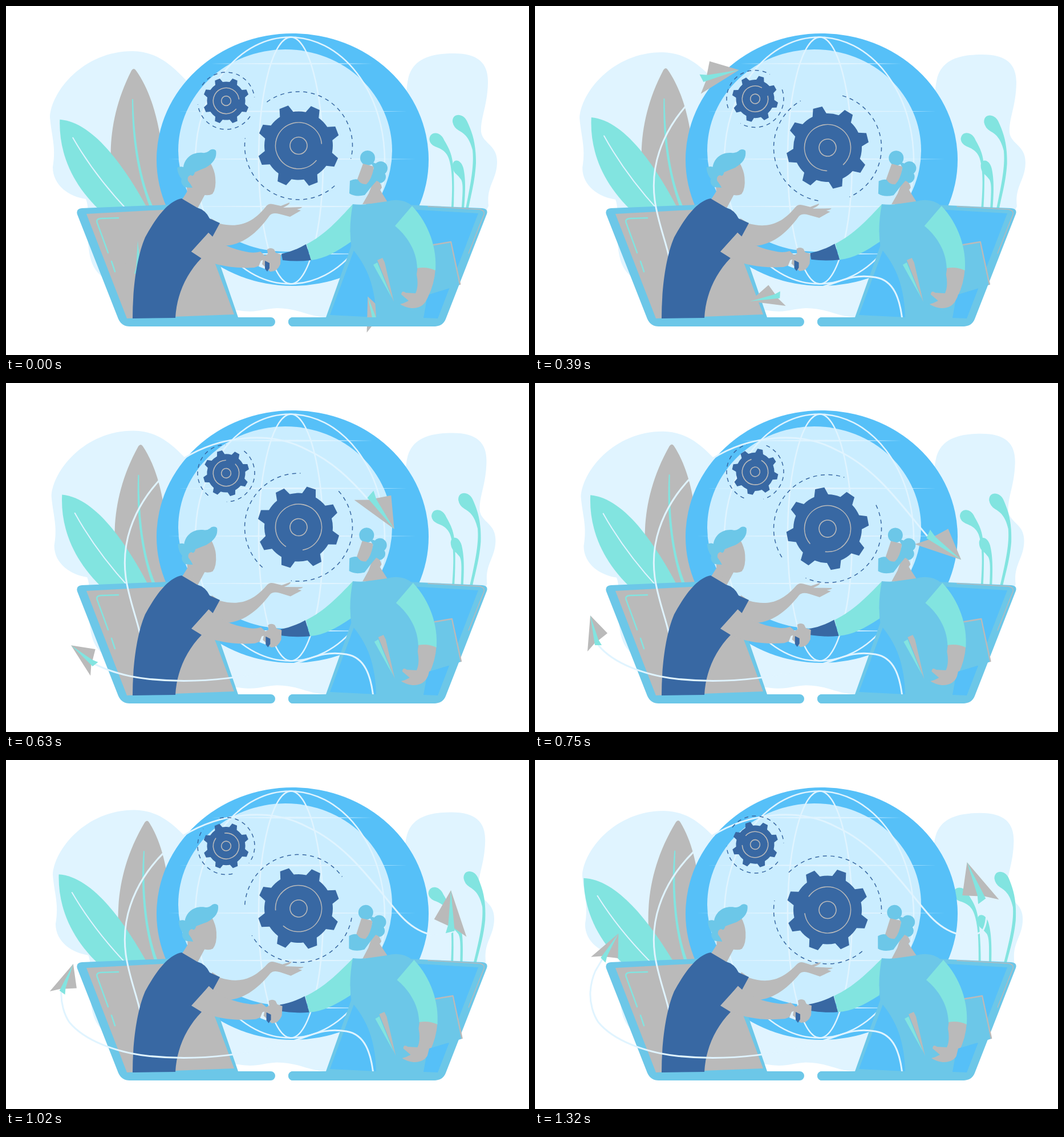
Animation of 917x611 px, one loop 1350 ms. Source, as an HTML page:

```html
<!DOCTYPE html>
<html lang="en">
<head>
<meta charset="utf-8">
<title>Online partnership</title>
<style>
  html, body { margin: 0; width: 100%; height: 100%; overflow: hidden; background: #fff; }
  svg { display: block; width: 100vw; height: 100vh; }
  .pale { fill: #e0f4ff; } .sky { fill: #56c0f8; } .blue { fill: #6cc7e8; }
  .teal { fill: #82e4e0; } .gray { fill: #bababa; } .navy { fill: #3868a3; }
  .line { fill: none; stroke-linecap: round; stroke-linejoin: round; }
  .line.pale { stroke: #e0f4ff; } .line.teal { stroke: #82e4e0; }
  .line.gray { stroke: #bababa; } .line.navy { stroke: #3868a3; stroke-linecap: butt; }
</style>
</head>
<body>
<svg viewBox="0 0 917 611">
  <path id="blob" class="pale" d="M77 195C79 150 135 79 222 79C270 80 295 108 330 145L690 200C704 175 700 150 705 128C712 95 740 83 785 83C830 83 846 102 845 135C844 175 832 195 833 220C836 242 862 242 861 275C860 305 842 315 846 350L800 450L640 540L560 545C525 542 515 530 475 529C450 530 440 538 408 533L260 520L170 475C150 460 145 440 143 400C143 375 146 352 140 338C112 334 82 315 82 282C88 245 80 230 77 195Z"/>

  <g id="tallLeaf">
    <path class="gray" d="M220 113Q224 107 228 113C258 155 282 230 280 380L205 380C180 310 168 215 220 113Z"/>
    <path class="teal" d="M221 163L223 163C225 230 234 300 258 352L252 352C230 295 220 230 221 163Z"/>
  </g>
  <g id="wideLeaf">
    <path class="teal" d="M94 199C150 203 205 275 252 362L178 370C118 320 92 260 94 199Z"/>
    <path class="line pale" stroke-width="2" d="M117 231Q155 297 215 360"/>
  </g>
  <path id="stemTall" class="teal" d="M783 203C782 187 801 187 808 201C818 222 824 240 824 275C822 310 815 330 809 365L804 365C815 310 821 280 818 252C812 229 803 223 794 218Q785 213 783 203Z"/>
  <path id="stemMid" class="teal" d="M742 234C742 219 761 218 768 235C778 252 784 262 785 300Q786 335 784 365L780 365C783 320 783 290 777 270C773 255 763 250 752 246Q743 242 742 234Z"/>
  <path id="stemLow" class="teal" d="M783 279C784 266 798 268 802 284C806 302 806 325 802 365L798 365C801 325 802 312 798 304Q793 297 787 292Q783 287 783 279Z"/>

  <ellipse class="sky" cx="502.500" cy="269" rx="238.500" ry="221"/>
  <ellipse fill="#caedff" cx="489.500" cy="253" rx="187.500" ry="177"/>
  <g class="line pale" stroke-width="2.500">
    <ellipse cx="498" cy="270.500" rx="166" ry="216"/>
    <ellipse cx="499.500" cy="270.500" rx="56.500" ry="216"/>
  </g>
  <path class="pale" d="M360 101L500 99.500 642 101 500 102.500ZM303 184.500L500 183 703 184.500 500 186ZM285 268L500 266.500 718 268 500 269.500ZM303 351L500 349.500 703 351 500 352.500ZM360 434L500 432.500 642 434 500 435.500Z"/>

  <path class="blue" d="M133 354L332 346L376 455L407 545H464A8 8 0 0 1 464 561H217Q203 561 197 548L125 365Q122 355 133 354Z"/>
  <path class="gray" d="M141 364L328 354L369 457L400 540L212 547Z"/>
  <path class="line teal" stroke-width="2.500" d="M197 371L166 372Q157 373 160 380L179 432M185 447L191 465"/>

  <path class="blue" d="M561 545L632 345L835 354Q846 355 843 364L771 548Q766 561 750 561H503A8 8 0 0 1 503 545Z"/>
  <path class="sky" d="M568 541L638 352L828 363L757 547L650 545Z"/>
  <path class="line gray" stroke-width="1.300" d="M740 351L830 356Q840 358 838 365L811 433"/>

  <g id="globeFlight"></g>
  <g id="gears"></g>

  <g id="leftMan">
    <path id="raisedArm" class="gray" d="M360 372L375 381C405 388 430 383 455 352Q460 345 468 347L482 350L497 344Q499 347 486 353L519 352Q519 354 510 356L517 358L498 369L479 364Q467 361 462 367C440 398 415 419 380 420L350 405Z"/>
    <path class="gray" d="M322 318L308 340L336 354L350 328Z"/>
    <path class="navy" d="M308 337C284 341 262 372 244 405C229 440 222 495 222 547L297 546C299 508 314 471 343 441L325 430L355 397L362 404L375 380L357 372Q350 357 335 353Z"/>
    <path id="loweredArm" class="gray" d="M355 397L325 430L343 442C365 454 400 460 435 458L450 453L457 440L446 430Q436 433 425 431C395 426 372 415 355 397Z"/>
    <g id="leftHead">
      <path class="gray" d="M318 290L330 284L358 274Q366 288 367 300Q369 320 362 329Q355 333 344 330L336 345L318 330L316 305Z"/>
      <path class="blue" d="M300 283Q306 280 311 282C313 267 326 255 345 257Q352 258 358 252Q364 249 368 253C371 268 360 277 350 283Q340 287 331 291Q329 300 324 296Q317 298 319 306Q324 312 327 318Q317 318 313 317Q305 310 308 303Q301 295 300 283Z"/>
    </g>
  </g>

  <g id="lowFlight"></g>

  <g id="rightMan">
    <g id="rightArm">
      <path class="teal" d="M608 347L606 412C580 430 560 442 535 445L527 417C560 400 582 375 608 347Z"/>
      <path class="navy" d="M526 417L535 445Q510 448 485 445L483 434Q506 429 526 417Z"/>
    </g>
    <g id="hands">
      <path class="pale" d="M447 446L455 443L456 461L443 456Z"/>
      <path class="gray" d="M458 426Q464 422 470 426L473 432L482 435L481 452Q475 466 463 465L449 452L452 438L459 434Z"/>
      <path class="navy" d="M454 446L462 450L462 459L458 465L454 460Z"/>
    </g>
    <g id="rightHead">
      <circle class="blue" cx="634" cy="266" r="13"/>
      <circle class="blue" cx="657" cy="284" r="12"/>
      <circle class="blue" cx="655" cy="299" r="11"/>
      <path class="gray" d="M645 305L636 328L625 347L670 345L656 322L659 318Q657 306 645 305Z"/>
      <path class="gray" d="M626 276L645 281L642 304L632 316L615 306Z"/>
      <path class="blue" d="M603 306Q612 302 617 304Q622 313 632 312Q641 304 645 283L638 272L655 278L655 300L641 316L629 331Q612 335 602 328Z"/>
    </g>
    <path class="blue" d="M608 347Q625 349 640 346L668 342Q695 335 712 350L724 375L740 500L732 547H649C648 500 638 460 606 424Q600 390 608 347Z"/>
    <g id="rightSide">
      <path class="blue" d="M740 421L778 413L796 488L715 514Z"/>
      <path class="line gray" stroke-width="2.500" d="M750 418L780 413L796 487"/>
      <path class="gray" d="M651 445L660 441L664 449L680 518Z"/>
      <path class="teal" d="M644 453L651 449L677 512Z"/>
      <path class="gray" d="M722 455L753 460Q751 490 737 515C730 530 710 534 691 522Q699 520 706 516L693 505Q694 497 701 502L718 503Q724 490 720 470Z"/>
      <path class="teal" d="M712 350C742 382 756 425 753 463Q738 456 721 459C720 425 700 400 682 385Z"/>
    </g>
    <path class="blue" d="M503 545H764Q758 561 750 561H503A8 8 0 0 1 503 545Z"/>
    <path class="sky" d="M742 505L776 495L757 547L732 546Z"/>
  </g>
</svg>

<script>
const LOOP = 1350, STEP = 30;
const $ = id => document.getElementById(id);

function add(parent, tag, attrs) {
  const el = document.createElementNS('http://www.w3.org/2000/svg', tag);
  for (const name in attrs) el.setAttribute(name, attrs[name]);
  return parent.appendChild(el);
}

const polar = (r, deg) => {
  const a = deg * Math.PI / 180;
  return (r * Math.cos(a)).toFixed(2) + ' ' + (r * Math.sin(a)).toFixed(2);
};
const arc = (r, from, to) =>
  `M${polar(r, from)}A${r} ${r} 0 ${to - from > 180 ? 1 : 0} 1 ${polar(r, to)}`;

// Gears
function makeGear({ x, y, size, tooth, gap, ring, dashes, dy, turn }) {
  const group = add($('gears'), 'g', {});
  let d = '';
  for (let i = 0; i < 8; i++) {
    const a = tooth + i * 45;
    d += `${i ? 'L' : 'M'}${polar(60 * size, a - 12)}L${polar(72.5 * size, a - 6.5)}` +
         `L${polar(72.5 * size, a + 6.5)}L${polar(60 * size, a + 12)}` +
         `A${60 * size} ${60 * size} 0 0 1 ${polar(60 * size, a + 33)}`;
  }
  add(group, 'path', { class: 'navy', d: d + 'Z' });
  const rings = arc(40.5 * size, gap[1], gap[0] + 360) + arc(15 * size, 0, 180) + arc(15 * size, 180, 360);
  add(group, 'path', { class: 'line gray', 'stroke-width': 1.6, d: rings });
  for (const start of dashes)
    add(group, 'path', { class: 'line navy', 'stroke-width': 1.5, 'stroke-dasharray': '7 6.5', d: arc(ring, start, start + 140) });
  return (t, ease) => group.setAttribute('transform',
    `translate(${x} ${y + dy * ease}) rotate(${turn * t / LOOP})`);
}

const gears = [
  makeGear({ x: 513, y: 244.5, size: 1, tooth: 24, gap: [-5, 40], ring: 94.5, dashes: [-126, 48], dy: 18, turn: 180 }),
  makeGear({ x: 386, y: 166, size: 0.56, tooth: 22.5, gap: [-8, 40], ring: 50, dashes: [33, 213], dy: -18, turn: -180 })
];

// Smooth curve through values at given times
function curve(times, values) {
  const last = times.length - 1;
  const slope = i => {
    const a = Math.max(0, i - 1), b = Math.min(last, i + 1);
    return (values[b] - values[a]) / (times[b] - times[a]);
  };
  return t => {
    let i = 0;
    while (i < last - 1 && t >= times[i + 1]) i++;
    const h = times[i + 1] - times[i], u = Math.min(1, (t - times[i]) / h);
    const v = 1 - u;
    return v * v * (1 + 2 * u) * values[i] + u * u * (3 - 2 * u) * values[i + 1] +
           h * u * v * (v * slope(i) - u * slope(i + 1));
  };
}

// Paper planes: each leg of the route ends at the matching time
const TIMES = [0, 270, 510, 750, 1020, 1200, 1320];

function makeFlight({ id, legs, tilt, shift, scale, flip }) {
  const trail = add($(id), 'path', { class: 'line pale', 'stroke-width': 3, style: 'stroke-linecap:butt' });
  const lengths = legs.map((_, i) => {
    trail.setAttribute('d', legs.slice(0, i + 1).join(''));
    return i ? trail.getTotalLength() : 0;
  });
  const plane = add($(id), 'g', {});
  add(plane, 'path', { class: 'gray', d: 'M0 0L-5 63L9 47L15 43L30 31Z' });
  add(plane, 'path', { class: 'teal', d: 'M0 0L8 52L20 52L14 42Z' });
  const [along, angle, side, zoom] = [lengths, tilt, shift, scale].map(v => curve(TIMES, v));
  return t => {
    const length = Math.max(0, along(t));
    const p = trail.getPointAtLength(length);
    trail.setAttribute('stroke-dasharray', `${length} 3000`);
    plane.setAttribute('transform',
      `translate(${p.x} ${p.y}) rotate(${angle(t)}) scale(${flip * zoom(t)} ${zoom(t)}) translate(${-side(t)} -52)`);
  };
}

const flights = [
  makeFlight({
    id: 'globeFlight', flip: -1,
    legs: ['M240 465', 'C236 427 216 385 210 340', 'C200 265 235 190 310 133C375 92 465 82 530 118',
      'C600 150 645 218 688 268', 'C715 300 755 318 784 300', 'C792 290 794 265 790 251', 'L787 245'],
    tilt: [-15, 4, 119, 113, -14, -33, -36],
    shift: [5, 0, 3, 11, 10, 11, 11],
    scale: [1.05, 1.13, 1.36, 1.36, 1.36, 1.36, 1.36]
  }),
  makeFlight({
    id: 'lowFlight', flip: 1,
    legs: ['M645 560', 'C641 510 628 480 597 475', 'C560 469 540 480 515 488C440 515 340 528 248 518',
      'C195 512 138 492 111 459', 'C102 446 96 425 97 406', 'C98 392 101 380 106 369', 'L118 349'],
    tilt: [-3, -84, -72, 0, 36, 44, 45],
    shift: [8, 6, 12, 14, 12, 12, 12],
    scale: [1, 1, 1, 1, 1, 1, 1]
  })
];

// Swinging parts: pivot x, pivot y, degrees
const swings = {
  tallLeaf: [290, 467, 4.35], stemTall: [705, 650, 2.9], stemLow: [800, 400, -3.5],
  raisedArm: [370, 395, 4.5], loweredArm: [320, 375, -2.4], leftHead: [330, 350, 2.6],
  rightArm: [606, 365, 2.9], rightHead: [650, 345, -2.7]
};
const sways = { wideLeaf: [300, 440, 2.1], stemMid: [770, 420, 2.6] };
const slides = { hands: [3, -5], rightSide: [4, 0] };

const rotate = (id, [x, y, deg], amount) =>
  $(id).setAttribute('transform', `rotate(${deg * amount} ${x} ${y})`);
const slide = (id, [x, y], amount) =>
  $(id).setAttribute('transform', `translate(${x * amount} ${y * amount})`);

function draw(t) {
  const ease = (1 - Math.cos(Math.PI * t / LOOP)) / 2;
  const sway = 0.55 - 2 * (1 - Math.cos(Math.PI * (t - 465) / 2000));
  for (const id in swings) rotate(id, swings[id], ease);
  for (const id in sways) rotate(id, sways[id], sway);
  for (const id in slides) slide(id, slides[id], ease);
  $('blob').setAttribute('transform',
    `translate(469 550) scale(${1 - 0.015 * ease} ${1 - 0.021 * ease}) translate(-469 -550)`);
  gears.forEach(turn => turn(t, ease));
  flights.forEach(fly => fly(t));
}

const start = performance.now();
function tick() {
  const t = (performance.now() - start) % LOOP;
  draw(Math.floor(t / STEP) * STEP);
  requestAnimationFrame(tick);
}
tick();
</script>
</body>
</html>
```
